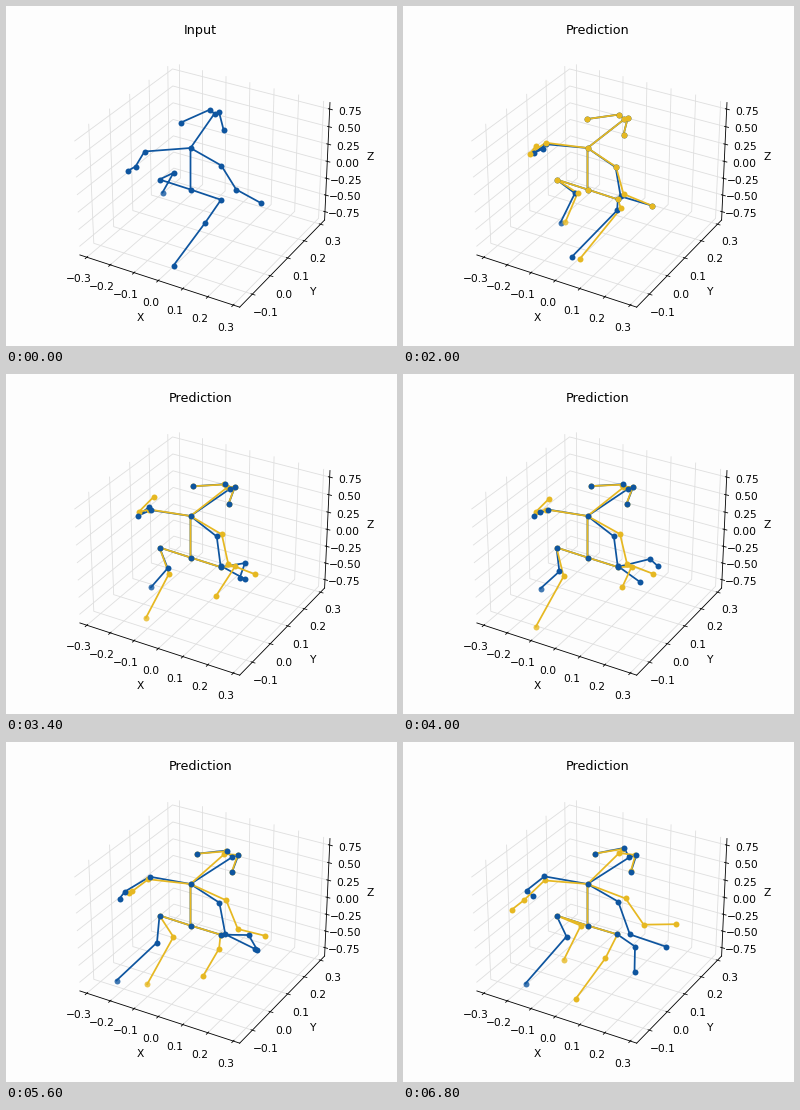
These frames come from a looping animation (391 px wide and 340 px high, 7 s). A matplotlib script:

```python
import numpy as np
import matplotlib.pyplot as plt
from matplotlib.animation import FuncAnimation

W, H, DPI = 391, 340, 68
FRAMES, STEP = 35, 200
SPLIT = 10  # first predicted step
PAPER, BLUE, GOLD = "#fdfdfd", "#0e559f", "#e6b822"

plt.rcParams.update({
    "font.family": "DejaVu Sans", "font.size": 11.3,
    "figure.facecolor": PAPER, "axes.facecolor": PAPER,
    "grid.color": "#dfdfdf", "grid.linewidth": 0.9,
    "axes.linewidth": 0.9, "xtick.major.width": 0.9,
    "axes.labelpad": 7.3,
})

BONES = [
    ("neck", "pelvis"), ("neck", "nose"),
    ("neck", "l_shoulder", "l_elbow", "l_wrist"),
    ("neck", "r_shoulder", "r_elbow", "r_wrist"),
    ("pelvis", "l_hip", "l_knee", "l_ankle"),
    ("pelvis", "r_hip", "r_knee", "r_ankle"),
    ("nose", "l_eye", "l_ear"), ("nose", "r_eye", "r_ear"),
]
FADED = {"l_ankle"}


def rise(n, tau):
    """Quick start that settles towards 1."""
    return 1 - np.exp(-n / tau)


def arch(n, span):
    return np.sin(np.pi * n / span)


def swing(n, center, reach, peak=0, cycle=36):
    """Pendulum about a centre, fully out at the peak step."""
    return np.add(center, np.multiply(reach, np.cos(2 * np.pi * (n - peak) / cycle)))


def path(*keys):
    """Smooth curve through a few (step, x, y) keys."""
    t, *xy = np.transpose(keys).astype(float)
    p = np.transpose(xy)
    slope = np.gradient(p, t, axis=0)

    def at(n):
        i = int(np.clip(np.searchsorted(t, n, "right") - 1, 0, len(t) - 2))
        h = t[i + 1] - t[i]
        s = (n - t[i]) / h
        return ((1 + 2 * s) * (1 - s) ** 2 * p[i] + s * (1 - s) ** 2 * h * slope[i]
                + s * s * (3 - 2 * s) * p[i + 1] + s * s * (s - 1) * h * slope[i + 1])
    return at


# Limbs whose motion is too irregular for one swing
LIMBS = {
    "l_elbow": path((0, 130, 161), (10, 131, 147.5), (20, 131, 142.3),
                    (28, 119.5, 150), (34, 124, 149)),
    "l_wrist": path((0, 122, 165.5), (4, 124.5, 164.5), (14, 147.7, 132),
                    (20, 137, 138), (28, 114, 157), (34, 130, 154.5)),
    "r_wrist": path((0, 255, 197.3), (4, 243.3, 206), (10, 249, 200),
                    (20, 237.5, 208.5), (34, 263, 205)),
    "l_knee": path((0, 168, 167.3), (5, 176, 180.5), (14, 166.5, 191.5),
                   (28, 151.5, 201), (34, 164, 195)),
    "l_ankle": path((0, 157, 187), (4, 167, 203), (10, 158, 217),
                    (20, 138, 215), (28, 111, 239), (34, 123, 242)),
    "r_knee": path((0, 199.5, 217.5), (4, 198, 217), (14, 229.5, 195.3),
                   (20, 247.5, 185.5), (34, 232.5, 205)),
    "r_ankle": path((0, 168, 260), (5, 156, 268), (10, 169, 251.7),
                    (20, 255, 192.3), (28, 251.5, 208), (34, 232, 230)),
}


def truth(n):
    joints = {
        "neck": (185, 142.5), "pelvis": (185, 184),
        "l_hip": (154, 174), "r_hip": (215.5 - n / 60, 194.3 - n / 25),
        "nose": (209 + 18 * rise(n, 8), 108 + 8 * rise(n, 8)),
        "l_eye": (204 + 18 * rise(n, 9), 104.3 + 6.5 * arch(n, 38)),
        "l_ear": (175.5 + 20 * rise(n, 18), 117 - 5 * rise(n, 9)),
        "r_eye": (213.5 + 22 * rise(n, 13), 106.5 + 7 * rise(n, 6)),
        "r_ear": (218 + 0.3 * n, 124 + 7 * rise(n, 7)),
        "l_shoulder": (139 + 6.5 * arch(n, 40), 146 - 11.5 * rise(n, 10)),
        "r_shoulder": swing(n, (213.5, 161.5), (2.3, -1.5)),
        "r_elbow": (215 + 14 * ((n - 18) / 17) ** 2, 184 + 9 * rise(n, 7)),
    }
    joints.update({name: at(n) for name, at in LIMBS.items()})
    return {name: np.array(p) for name, p in joints.items()}


def guess(n):
    """Regular gait that drifts away from the true pose."""
    m = n - SPLIT
    joints = truth(n)
    joints["nose"] += np.multiply(m, (-0.42, -0.18))
    joints["l_eye"] += np.multiply(m, (-0.05, 0.04))
    joints["r_eye"] += np.multiply(m, (-0.04, 0))
    joints["r_ear"] += np.multiply(m, (0, -0.04))
    joints.update({
        "l_shoulder": swing(n, (143, 137.5), (1, -1.5), 18),
        "l_elbow": swing(n, (127, 149), (6.5, -11), 18.5),
        "l_wrist": swing(n, (128.5, 146), (20, -23), 17.5),
        "r_shoulder": (213.5 + 0.4 * m, 161.3 - 0.0075 * m ** 2),
        "r_elbow": (221 + 0.035 * m ** 2, 188.5 + 0.45 * m - 0.028 * m ** 2),
        "r_wrist": (249 + 0.0018 * m ** 3, 200 + 0.2 * m - 0.0016 * m ** 3),
        "l_knee": swing(n, (171.5, 191.5), (-10.5, 11.5), 21),
        "l_ankle": swing(n, (149.5, 233), (-18, 22.5), 22.3, 32),
        "r_knee": swing(n, (216, 205), (14, -12.5), 18),
        "r_ankle": swing(n, (196.5, 235.5), (24, -22.5), 21.2, 28),
    })
    return joints


fig = plt.figure(figsize=(W / DPI, H / DPI), dpi=DPI)

# Empty 3D box
side, left, bottom = 284.5, 52.4, 20.9
box = fig.add_axes([left / W, bottom / H, side / W, side / H], projection="3d")
box.view_init(elev=30, azim=-60)
box.set_xticks(np.arange(-3, 4) / 10)
box.set_yticks(np.arange(-1, 4) / 10)
box.set_zticks(np.arange(-3, 4) / 4)
box.set(xlim=(-0.330, 0.325), ylim=(-0.168, 0.326), zlim=(-0.877, 0.842),
        xlabel="X", ylabel="Y", zlabel="Z")
box.tick_params(pad=5)
for axis in (box.xaxis, box.yaxis, box.zaxis):
    axis.set_pane_color(PAPER)
title = box.set_title("Input", pad=6.8)
title.set_y(1)  # 3D axes lower their titles by default

# Skeletons are placed in stage pixels
stage = fig.add_axes([0, 0, 1, 1])
stage.set(xlim=(0.5, W + 0.5), ylim=(H + 0.5, 0.5))
stage.axis("off")


class Skeleton:
    def __init__(self, pose, color, zorder):
        self.pose = pose
        self.lines, = stage.plot([], [], color=color, lw=1.85, zorder=zorder)
        dots = dict(ls="", marker="o", ms=6.3, mew=0, color=color)
        self.near, = stage.plot([], [], **dots)
        self.far, = stage.plot([], [], alpha=0.78, **dots)

    def show(self, on):
        for artist in (self.lines, self.near, self.far):
            artist.set_visible(on)

    def update(self, n, dot_order):
        at = self.pose(n)
        gap = [(np.nan, np.nan)]
        runs = [p for chain in BONES for p in [at[j] for j in chain] + gap]
        self.lines.set_data(*np.transpose(runs))
        self.near.set_data(*np.transpose([at[j] for j in at if j not in FADED]))
        self.far.set_data(*np.transpose([at[j] for j in FADED]))
        self.near.set_zorder(dot_order)
        self.far.set_zorder(dot_order)


real = Skeleton(truth, BLUE, 2)
predicted = Skeleton(guess, GOLD, 3)


def draw(n):
    predicting = n >= SPLIT
    title.set_text("Prediction" if predicting else "Input")
    real.update(n, 6 if n >= SPLIT + 2 else 4)
    predicted.show(predicting)
    if predicting:
        predicted.update(n, 5)
    return []


anim = FuncAnimation(fig, draw, frames=FRAMES, interval=STEP,
                     init_func=lambda: draw(0), repeat=True, repeat_delay=0)
plt.show()
```
